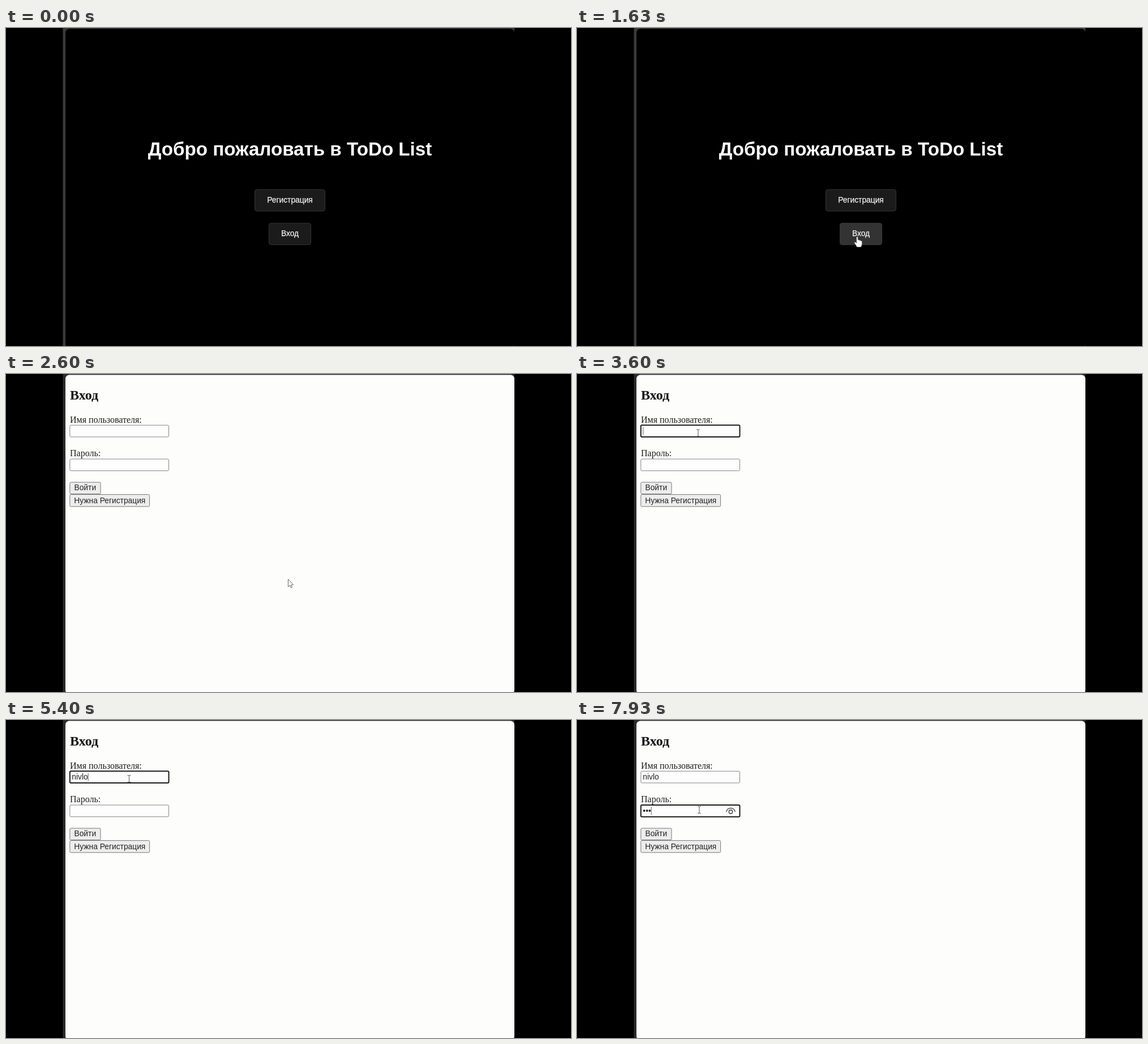
Recreate the animation shown at these times as an HTML page. Size 998 px wide and 561 px high, loop 8 s.

```html
<!DOCTYPE html>
<html lang="ru">
<head>
<meta charset="utf-8">
<title>ToDo List</title>
<style>
  html, body { margin: 0; width: 100%; height: 100%; overflow: hidden; background: #000; }
  svg { display: block; width: 100vw; height: 100vh; }
  text { font: 13.8px "Liberation Sans", Arial, sans-serif; white-space: pre; }
  .title { font-size: 33.15px; font-weight: bold; fill: #fff; }
  .mid { text-anchor: middle; }
  .dark rect { fill: #1b1b1b; stroke: #353533; }
  .dark .label { fill: #f4f4f4; stroke: #f4f4f4; stroke-width: .25; }
  .light text { fill: #222; }
  .light .serif { font: 16px "Liberation Serif", "Times New Roman", serif; fill: #1c1c1c; }
  .light .heading { font-size: 24px; font-weight: bold; fill: #111; }
  .button { fill: #ededed; stroke: #777; }
  .field { fill: #fdfdfd; stroke: #858588; }
  .field.focus { stroke: #1a1a1a; stroke-width: 2; }
</style>
</head>
<body>
<svg viewBox="0 0 998 561">
  <rect width="998" height="561" fill="#000"/>
  <rect id="frame" x="100.5" width="797.5" height="561"/>
  <rect id="page" x="105" y="1.5" width="793" height="563" rx="7"/>

  <g id="welcome" class="dark">
    <text class="title mid" x="501.5" y="224.8">Добро пожаловать в ToDo List</text>
    <rect x="439.5" y="285" width="124" height="38" rx="4"/>
    <text class="label mid" x="501.5" y="307.5">Регистрация</text>
    <rect x="464.5" y="344.3" width="74" height="38" rx="4"/>
    <rect id="hover" x="464.5" y="344.3" width="74" height="38" rx="4" style="fill:#333;stroke:#393938"/>
    <text class="label mid" x="501.5" y="367">Вход</text>
  </g>

  <g id="login" class="light">
    <text class="serif heading" x="113" y="45">Вход</text>
    <text class="serif" x="113" y="85.5">Имя пользователя:</text>
    <rect id="nameField" class="field" x="112.8" y="90.3" width="174.7" height="20.7" rx="2"/>
    <text id="nameText" x="116.3" y="104.8"></text>
    <text class="serif" x="113" y="145.3">Пароль:</text>
    <rect id="passField" class="field" x="112.8" y="150" width="174.7" height="20.7" rx="2"/>
    <text id="passText" x="116.3" y="165"></text>
    <g id="eye" fill="none" stroke="#444" stroke-width="1.4" stroke-linecap="round">
      <path d="M263.8 161.5C266 153.5 277 153.5 279.2 161.5"/>
      <circle cx="271.5" cy="162" r="3.2"/>
    </g>
    <rect id="caret" width="1" height="14" fill="#666"/>
    <rect class="button" x="112.8" y="191" width="54.2" height="20.6" rx="2"/>
    <text class="mid" x="139.8" y="205.3">Войти</text>
    <rect class="button" x="112.8" y="212.6" width="140.8" height="21.2" rx="2"/>
    <text class="mid" x="183.3" y="227.7">Нужна Регистрация</text>
  </g>

  <g id="pointer">
    <path id="arrow" d="M0 0V13.4L3 10.7L5 15.3L7 14.4L5.1 10H9.2Z" fill="#fff" stroke="#555" stroke-width=".9"/>
    <path id="hand" d="M-1.4 1Q0 -1 1.3 1V6Q3 5 4 6.6Q5.6 6 6.4 7.4Q8.2 7 8.6 9V13Q8 16 6.8 18.5H-.6Q-2 15.5-4.6 12Q-6 9.4-3.8 9.4L-1.4 11.2Z" fill="#fff" stroke="#222" stroke-width=".5"/>
    <path id="beam" d="M-3-6H-1L0-5.3L1-6H3M0-5.3V5.3M-3 6H-1L0 5.3L1 6H3" fill="none" stroke="#666" stroke-width="1.1"/>
  </g>
</svg>
<script>
  const LOOP = 8000, LOADED = 2600, ENTER_BUTTON = 1120;
  const USER = "nivlo";
  const FOCUS = { name: 3450, pass: 6430 };
  const KEYS = {
    name: [4300, 4560, 4800, 5090, 5370],
    pass: [7200, 7670, 7900]
  };
  // time, x, y of the pointer hotspot
  const PATH = [
    [300, 560, 600], [1300, 495, 368], [1750, 495, 368], [2300, 498.4, 362],
    [2760, 498.4, 362], [3340, 214, 104], [4200, 214, 104], [4500, 217.5, 103.5],
    [5830, 217.5, 103.5], [6330, 216, 158.5], [LOOP, 216, 158.5]
  ];
  const el = {};
  document.querySelectorAll("[id]").forEach(node => el[node.id] = node);

  const show = (node, on) => node.setAttribute("visibility", on ? "visible" : "hidden");
  const clamp = v => Math.max(0, Math.min(1, v));
  const typed = (keys, t) => keys.filter(k => k <= t).length;

  function pointerAt(t) {
    const i = Math.max(1, PATH.findIndex(p => p[0] > t));
    const [t0, x0, y0] = PATH[i - 1], [t1, x1, y1] = PATH[i];
    const u = clamp((t - t0) / (t1 - t0)), e = u * u * (3 - 2 * u);
    return [x0 + (x1 - x0) * e, y0 + (y1 - y0) * e];
  }

  function inside(node, x, y) {
    const b = node.getBBox();
    return x >= b.x && x <= b.x + b.width && y >= b.y && y <= b.y + b.height;
  }

  function drawPointer(t, onLogin) {
    const [x, y] = pointerAt(t);
    let kind = "arrow";
    if (!onLogin && t < 2530 && inside(el.hover, x, y)) kind = "hand";
    if (onLogin && (inside(el.nameField, x, y) || inside(el.passField, x, y))) kind = "beam";
    el.pointer.setAttribute("transform", `translate(${x} ${y})`);
    ["arrow", "hand", "beam"].forEach(k => show(el[k], k === kind));
    el.arrow.setAttribute("stroke", onLogin ? "#555" : "#222");
  }

  function drawCaret(t, active) {
    if (!active) return show(el.caret, false);
    const text = el[active + "Text"];
    const last = Math.max(FOCUS[active], ...KEYS[active].filter(k => k <= t));
    const width = text.textContent ? text.getComputedTextLength() : 0;
    el.caret.setAttribute("x", 116.3 + width);
    el.caret.setAttribute("y", active === "name" ? 93.5 : 153.2);
    show(el.caret, Math.floor((t - last) / 500) % 2 === 0);
  }

  function render(t) {
    const onLogin = t >= LOADED;
    const active = t >= FOCUS.pass ? "pass" : t >= FOCUS.name ? "name" : null;
    const dots = typed(KEYS.pass, t);
    el.welcome.style.display = onLogin ? "none" : "";
    el.login.style.display = onLogin ? "" : "none";
    el.frame.setAttribute("fill", onLogin ? "#2b2b2c" : "#3a3a39");
    el.page.setAttribute("fill", onLogin ? "#fdfdfc" : "#000");
    el.hover.setAttribute("opacity", clamp((t - ENTER_BUTTON) / 250));
    el.nameText.textContent = USER.slice(0, typed(KEYS.name, t));
    el.passText.textContent = "•".repeat(dots);
    ["name", "pass"].forEach(f => el[f + "Field"].classList.toggle("focus", f === active));
    show(el.eye, dots > 0);
    drawCaret(t, active);
    drawPointer(t, onLogin);
  }

  const start = performance.now();
  function tick() {
    render((performance.now() - start) % LOOP);
    requestAnimationFrame(tick);
  }
  tick();
</script>
</body>
</html>
```
